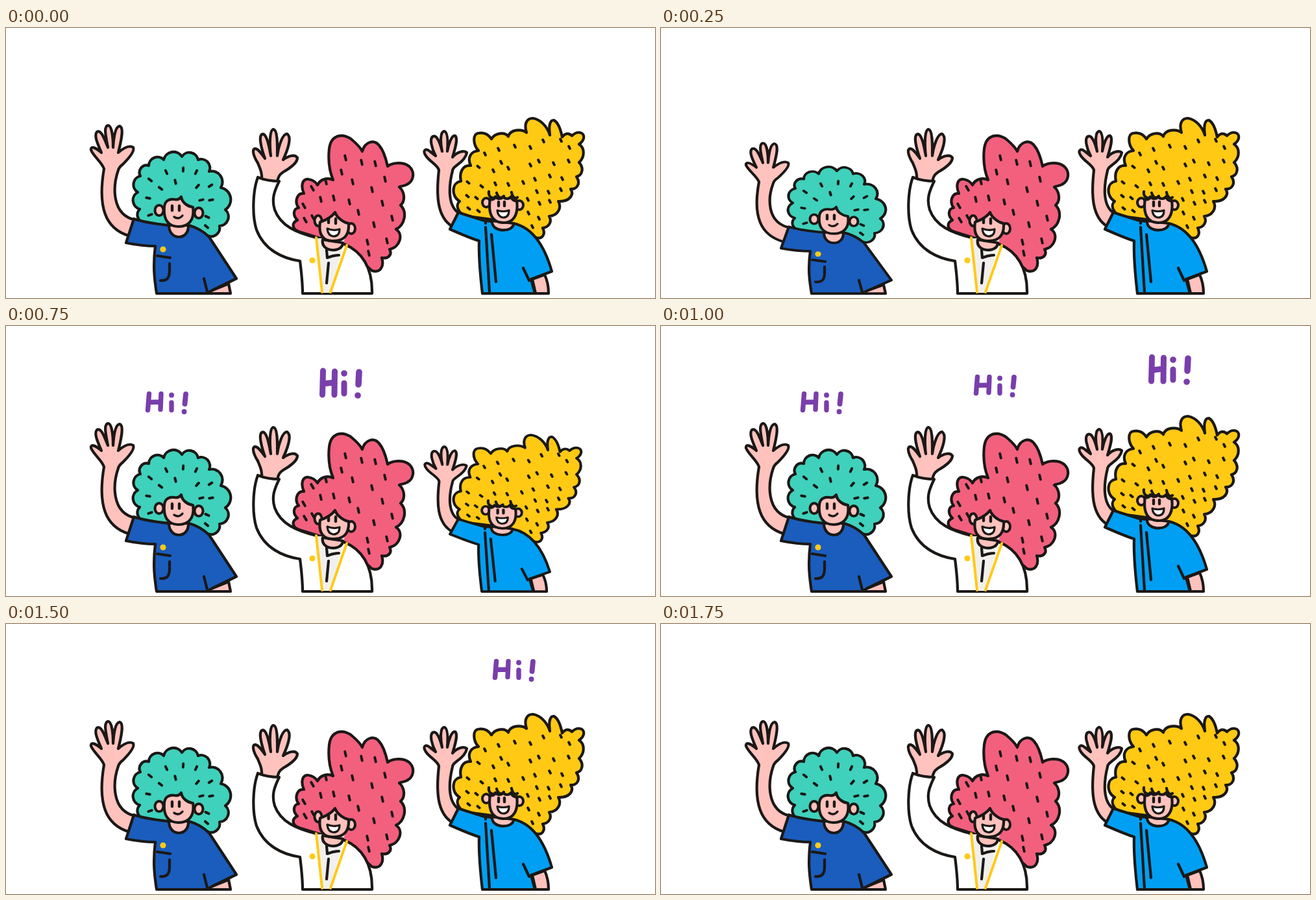
An HTML page for the animation above (2 s loop, 1000 by 416 pixels).

```html
<!DOCTYPE html>
<html lang="en">
<head>
<meta charset="utf-8">
<title>Waving friends</title>
<style>
html, body { margin: 0; width: 100%; height: 100%; overflow: hidden; background: #fff; }
svg { display: block; width: 100%; height: 100%; }
</style>
</head>
<body>
<svg id="stage" viewBox="0 0 1000 416" fill="none" stroke-linecap="round" stroke-linejoin="round"></svg>
<script>
const INK = '#1b1816', SKIN = '#ffc2bd', GOLD = '#ffc917', PURPLE = '#793eab';
const STEP = 250, STEPS = 8, FLOOR = 410;

const shape = (d, fill = 'none', stroke = INK, width = 4.2) =>
  `<path d="${d}" fill="${fill}" stroke="${stroke}" stroke-width="${width}"/>`;
const ear = (x, y, rx, ry) =>
  `<ellipse cx="${x}" cy="${y}" rx="${rx}" ry="${ry}" fill="${SKIN}" stroke="${INK}" stroke-width="4"/>`;
const badge = (x, y) => `<circle cx="${x}" cy="${y}" r="4.6" fill="${GOLD}"/>`;

// Round bumps between neighbouring notch points
function bumps(points) {
  let d = '';
  points.forEach(([x, y], i) => {
    if (!i) { d = `M${x} ${y}`; return; }
    const [px, py] = points[i - 1];
    const r = Math.hypot(x - px, y - py) * 0.54;
    d += `A${r} ${r} 0 0 1 ${x} ${y}`;
  });
  return d + 'Z';
}

// Short hair strokes; angle(x, y) gives each direction
function dashes(list, length, angle) {
  let d = '';
  for (let i = 0; i < list.length; i += 2) {
    const [x, y] = [list[i], list[i + 1]], a = angle(x, y);
    const dx = Math.cos(a) * length / 2, dy = Math.sin(a) * length / 2;
    d += `M${x - dx} ${y - dy}L${x + dx} ${y + dy}`;
  }
  return shape(d, 'none', INK, 4);
}

const greenHair = bumps([[215, 300], [206, 279], [203, 253], [207, 228], [220, 212], [243, 203],
  [271, 198], [296, 203], [313, 221], [331, 246], [338, 280], [329, 305], [309, 319]]);

const friends = [
  {
    art: [
      shape(greenHair, '#3fd1bb'),
      dashes([247, 222, 273, 218, 293, 222, 222, 234, 238, 247, 261, 237, 295, 244, 315, 243,
        219, 262, 301, 265, 316, 265, 222, 288, 310, 291, 309, 306], 5.5,
        (x, y) => Math.atan2(y - 272, x - 270)),
      shape('M151 217C148 207 135 198 131 188C130 181 138 184 147 192C142 180 135 166 140 160C147 156 152 172 157 184C154 168 150 152 157 150C163 150 165 168 165 184C166 170 168 152 175 151C182 153 178 172 173 192C181 185 190 180 196 184C199 190 188 202 180 210C176 213 174 215 173 219C165 242 161 288 200 296L189 320C153 309 141 276 151 217', SKIN),
      shape('M318 404L343 394L346 409H309Z', SKIN),
      shape('M197 294C214 300 233 302 251 304H282C296 308 306 315 313 322L355 386L318 404L309 409H232C229 389 226 368 230 336C214 336 200 334 185 331Z', '#1a5dbd'),
      shape('M305 386L310 406M233 351L253 354M252 363V374C252 385 248 390 238 389'),
      badge(242, 341),
      shape('M251 304C251 328 282 328 281 304Z', SKIN),
      ear(236, 281, 6.5, 8), ear(297, 285, 6.5, 8),
      shape('M244 275C245 266 252 263 259 264C264 265 268 263 270 260C271 269 280 275 288 276C291 296 281 306 266 306C250 306 242 295 244 275Z', SKIN),
      shape('M256 274V281M267 274V281', 'none', INK, 4.4),
      shape('M259 291Q266 296 272 289', 'none', INK, 3.4)
    ],
    pivot: 265, sx: 1, sy: 0.895, hi: [0, 0]
  },
  {
    art: [
      shape('M452 314C440 310 440 300 449 296C441 288 443 278 451 277C444 268 448 254 459 255C453 241 458 232 466 233C473 234 477 237 480 242C484 233 495 230 504 234C499 222 496 205 498 186C501 162 522 162 534 173C541 179 546 184 549 190C553 175 567 171 575 181C583 190 586 204 588 213C596 207 612 206 621 213C631 222 628 236 618 241C613 244 609 243 606 245C614 252 616 266 608 273C619 284 614 304 601 310C613 318 607 338 591 341C596 350 588 356 579 354C583 367 577 378 564 374L520 335Z', '#f2607e'),
      dashes([523, 200, 548, 207, 569, 209, 517, 222, 534, 237, 584, 233, 493, 237, 472, 247,
        485, 264, 505, 262, 564, 249, 529, 268, 580, 270, 459, 274, 461, 296, 473, 292,
        543, 284, 595, 293, 567, 303, 557, 330, 587, 328, 559, 347], 7,
        x => x < 475 ? 1.05 : 1.35),
      shape('M394 234C395 222 391 216 388 208C381 197 379 188 383 186C388 185 394 194 399 201C394 187 389 168 394 164C401 160 405 180 408 197C406 180 406 157 412 156C419 157 418 182 418 197C420 182 426 163 433 163C441 168 434 188 427 203C435 197 445 194 449 200C449 208 436 217 427 222C421 226 419 230 418 238Z', SKIN),
      shape('M388 230C398 234 409 236 421 236C413 252 409 264 414 280C423 305 447 315 478 323L521 333C548 344 565 369 564 409H457C457 391 455 375 453 359C426 355 398 342 386 311C379 289 380 252 388 230Z', '#fff'),
      shape('M479 324H522L500 408H487Z', '#f1f0ee', 'none', 0),
      shape('M488 326C484 346 519 347 519 331Z', SKIN),
      shape('M494 342L495 354Q505 350 513 350M497 362L494 393'),
      shape('M478 323L487 407M525 335L500 407', 'none', GOLD, 4),
      badge(472, 358),
      ear(481, 297, 5.5, 8), ear(532, 309, 6, 8),
      shape('M484 299C493 296 502 291 507 284C510 293 521 300 528 301C529 319 521 328 505 328C489 329 481 319 484 299Z', SKIN),
      shape('M497 293V300M508 294V301', 'none', INK, 4.4),
      shape('M495 309Q505 313 514 310Q514 321 504 321Q496 320 495 309Z', '#fff', INK, 3.2)
    ],
    pivot: 455, sx: 0.99, sy: 0.897, hi: [267, -26]
  },
  {
    art: [
      shape('M711 290C696 287 692 272 699 267C686 260 686 238 701 236C698 222 704 211 716 212C710 199 717 190 728 189C719 179 719 163 728 162C738 160 744 165 748 171C753 162 768 159 774 167C777 156 794 155 802 161C798 148 802 139 812 139C824 141 834 152 838 165C836 150 838 142 844 142C852 146 855 158 857 168C862 161 868 162 872 166C880 158 892 160 890 170C889 174 886 177 883 179C892 185 892 199 883 207C891 216 888 227 879 229C886 239 880 249 870 248C876 257 868 268 851 267C857 277 850 289 837 290C842 299 836 307 827 308C832 318 826 326 817 323L770 298Z', '#ffc914'),
      dashes([738, 194, 759, 187, 784, 182, 808, 184, 828, 174, 855, 173, 868, 184, 728, 214,
        751, 220, 763, 207, 774, 216, 797, 238, 808, 211, 821, 205, 844, 209, 867, 205,
        712, 238, 733, 244, 754, 240, 774, 241, 815, 233, 838, 228, 857, 232, 818, 252,
        836, 253, 855, 249, 711, 259, 725, 262, 713, 278, 728, 282, 804, 264, 822, 270,
        838, 267, 805, 285, 821, 293, 811, 306], 4,
        x => x < 735 ? 0.7 : 1.1),
      shape('M667 219C665 211 653 206 647 197C641 188 647 185 653 190L662 197C656 186 652 170 658 167C664 164 669 178 672 190C669 176 669 160 675 159C681 160 681 176 680 190C682 178 687 165 692 166C697 170 692 186 688 199C695 191 705 188 710 192C709 200 701 207 694 212C690 215 688 217 688 220C682 244 680 275 699 286L688 306C663 291 663 255 667 219Z', SKIN),
      shape('M811 387L830 380C835 391 836 400 836 409H816Z', SKIN),
      shape('M697 284C711 289 725 293 738 297L782 301C810 307 829 333 841 375L809 387L815 409H734C731 383 728 355 729 328C713 323 698 316 684 310Z', '#009ff3'),
      shape('M797 370L806 389M739 300V301M739 307L745 408M748 318L755 391'),
      shape('M749 297C747 315 782 316 782 301Z', SKIN),
      ear(740, 269, 6, 7), ear(791, 273, 6, 7),
      shape('M746 263C750 266 753 263 754 260C758 264 763 264 766 260C769 264 775 264 778 260C780 265 783 267 787 266C790 289 781 300 767 300C751 300 742 289 746 263Z', SKIN),
      shape('M744 252C743 259 748 264 755 261M756 254C758 261 762 264 767 259M779 253C780 260 784 264 788 261'),
      shape('M759 268V274M768 268V274', 'none', INK, 4.4),
      shape('M757 281Q766 284 775 281Q775 292 766 292Q758 291 757 281Z', '#fff', INK, 3.2)
    ],
    pivot: 690, sx: 0.98, sy: 0.893, hi: [535, -47]
  }
];

const bigHi =
  shape('M221.5 95L220.5 132M239.5 96L239 132M221 115L239 113M254 114V130', 'none', PURPLE, 9) +
  shape('M254 99H254.1M277 97L276 116M275 133H275.1', 'none', PURPLE, 9.6);
const smallHi =
  shape('M220.5 104.5L218.5 129.5M239 104.5L238 128.5M220 117.5L238 117M255 118V129.5', 'none', PURPLE, 7.4) +
  shape('M255 106.5H255.1M277 105L275.5 120M274.5 132H274.6', 'none', PURPLE, 7.8);

const stage = document.getElementById('stage');
stage.innerHTML = friends.map(f => `<g class="friend">${f.art.join('')}</g>`).join('') +
  friends.map(f => `<g class="hi" role="img" aria-label="Hi!" transform="translate(${f.hi})"><g>${bigHi}</g><g>${smallHi}</g></g>`).join('');

const bodies = [...stage.querySelectorAll('.friend')];
const words = [...stage.querySelectorAll('.hi')];
const show = (el, on) => el.setAttribute('visibility', on ? 'visible' : 'hidden');

// Each friend ducks, pops up with a big word, then the word settles for two steps
function draw(time) {
  const step = Math.floor(time / STEP) % STEPS;
  friends.forEach(({ pivot, sx, sy }, i) => {
    const phase = step - i;
    bodies[i].setAttribute('transform', phase === 1
      ? `translate(${pivot} ${FLOOR}) scale(${sx} ${sy}) translate(${-pivot} ${-FLOOR})`
      : '');
    const [big, small] = words[i].children;
    show(big, phase === 2);
    show(small, phase === 3 || phase === 4);
  });
}

const start = performance.now();
function tick() {
  draw(performance.now() - start);
  requestAnimationFrame(tick);
}
tick();
</script>
</body>
</html>
```
